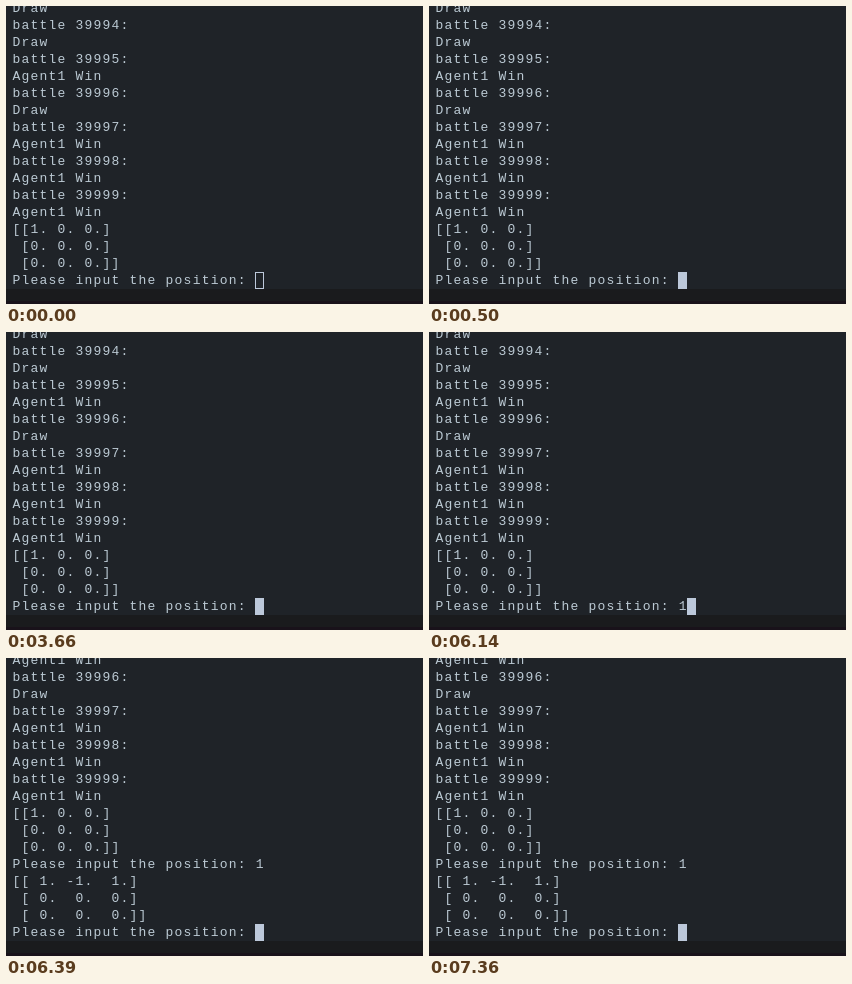
Write an HTML page with a canvas that moves like this. It is 417x298 px and loops after 8000 ms.

```html
<!DOCTYPE html>
<html lang="en">
<head>
<meta charset="utf-8">
<title>Terminal game</title>
<style>
  html, body { margin: 0; width: 100%; height: 100%; overflow: hidden; background: #1f2328; }
  canvas { display: block; }
</style>
</head>
<body>
<canvas id="stage" width="417" height="298"></canvas>
<script>
const ctx = document.getElementById('stage').getContext('2d', { alpha: false });

const LOOP = 8000;
const FOCUS_AT = 500, TYPE_AT = 5770, ENTER_AT = 6390;
const LEFT = 6, CELL = 9, LINE = 17, ROWS = 17, FIRST_BASELINE = 6;
const FONT_SIZE = 13, TRACKING = CELL - FONT_SIZE * 0.6;
const BACK = '#1f2328', INK = '#bccad4', CURSOR = '#bcc8da';

const PROMPT = 'Please input the position: ';
const win = 'Agent1 Win';
const results = ['Draw', 'Draw', win, 'Draw', win, win, win];

const log = results.flatMap((result, i) =>
  i ? [`battle ${39993 + i}:`, result] : [result]);
log.push('[[1. 0. 0.]', ' [0. 0. 0.]', ' [0. 0. 0.]]');

const reply = ['[[ 1. -1.  1.]', ' [ 0.  0.  0.]', ' [ 0.  0.  0.]]'];

function linesAt(t) {
  if (t < TYPE_AT) return [...log, PROMPT];
  const answered = [...log, PROMPT + '1'];
  return t < ENTER_AT ? answered : [...answered, ...reply, PROMPT];
}

function drawCursor(column, focused) {
  const x = LEFT + column * CELL;
  const y = FIRST_BASELINE + (ROWS - 1) * LINE - 12;
  ctx.fillStyle = CURSOR;
  ctx.fillRect(x, y, CELL, LINE);
  if (!focused) {
    ctx.fillStyle = BACK;
    ctx.fillRect(x + 1, y + 1, CELL - 2, LINE - 2);
  }
}

function draw(t) {
  ctx.fillStyle = BACK;
  ctx.fillRect(0, 0, 417, 298);
  ctx.fillStyle = '#1a1b1d';
  ctx.fillRect(0, 283, 417, 12);
  ctx.fillStyle = '#19121a';
  ctx.fillRect(0, 295, 417, 3);

  const lines = linesAt(t).slice(-ROWS);
  ctx.font = `${FONT_SIZE}px "Courier New", "Liberation Mono", monospace`;
  ctx.letterSpacing = `${TRACKING}px`;
  ctx.textBaseline = 'alphabetic';
  ctx.fillStyle = INK;
  lines.forEach((line, i) =>
    ctx.fillText(line, LEFT + TRACKING / 2, FIRST_BASELINE + i * LINE));
  drawCursor(lines[ROWS - 1].length, t >= FOCUS_AT);
}

const start = performance.now();
function tick() {
  draw((performance.now() - start) % LOOP);
  requestAnimationFrame(tick);
}
tick();
</script>
</body>
</html>
```
